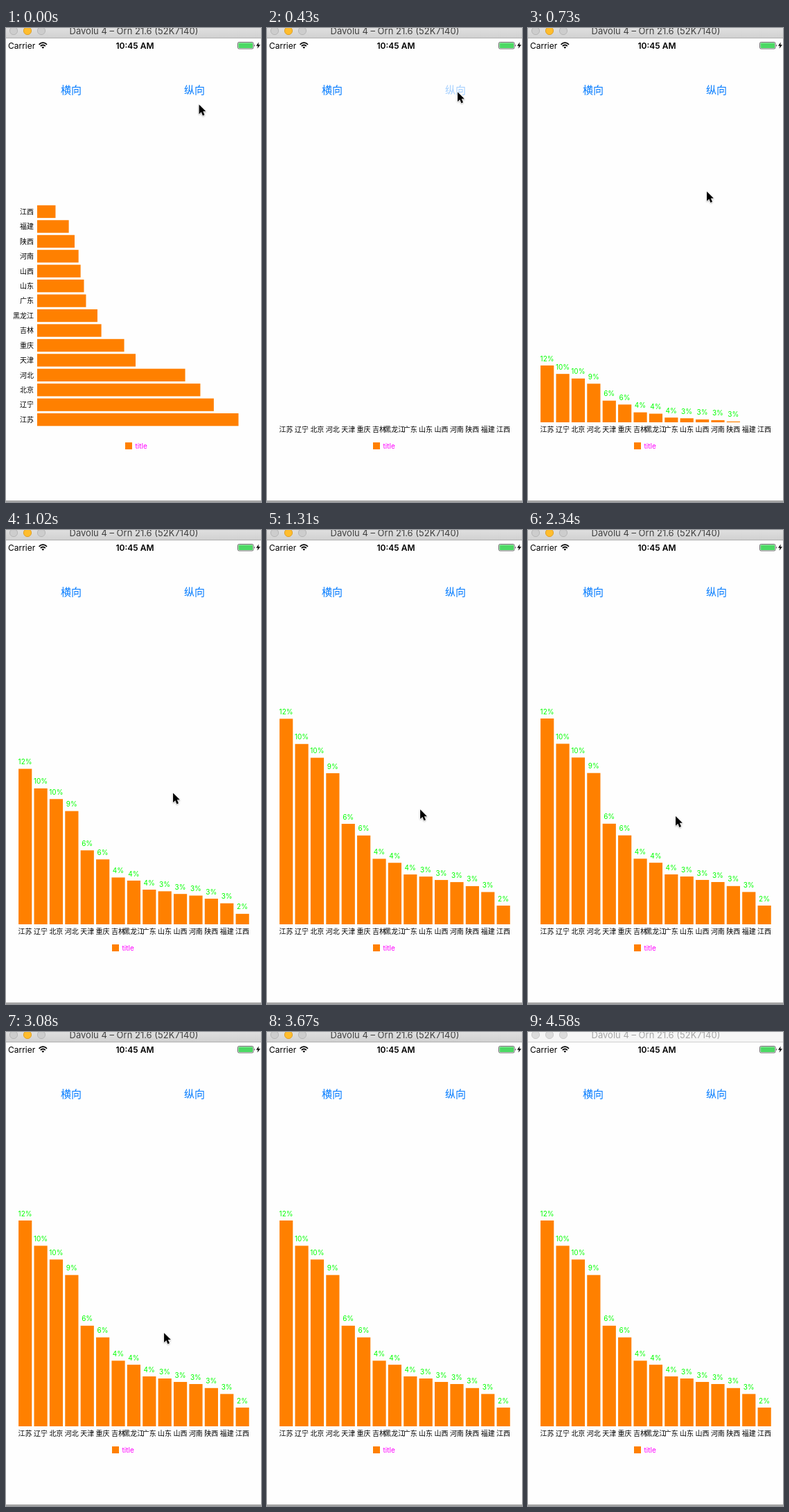
Animation of 368 by 684 pixels, one loop 4680 ms. Source, as an HTML page:

```html
<!DOCTYPE html>
<html lang="zh-CN">
<head>
<meta charset="utf-8">
<title>Bar chart</title>
<style>
  html, body { margin: 0; width: 100%; height: 100%; overflow: hidden; background: #fefefe; }
  svg { display: block; width: 368px; height: 684px; }
  text { font-family: Inter, "Noto Sans CJK SC", "Noto Sans CJK", sans-serif; white-space: pre; }
  .cjk { font-family: "Noto Sans CJK SC", "Noto Sans CJK", "Noto Sans", sans-serif; }
  .mid { text-anchor: middle; }
  .end { text-anchor: end; }
  .small { font-size: 10px; }
  .button { font-size: 15px; fill: #007aff; }
  .bar { fill: #ff8000; }
  .percent { fill: #00ff00; }
  .legend { fill: #ff00ff; }

  #titlebar { fill: url(#active); }
  #edge { fill: #b0b0b0; }
  #title { fill: #404040; }
  #lights circle { fill: #cdcdcd; stroke: #b6b6b6; }
  #lights .yellow { fill: #ffbd2e; stroke: #e0a028; }
  .inactive #titlebar { fill: #f6f6f6; }
  .inactive #edge { fill: #d0d0d0; }
  .inactive #title { fill: #a6a6a6; }
  .inactive #lights circle { fill: #dcdcdc; stroke: #cacaca; }
</style>
</head>
<body>
<svg id="stage" viewBox="0 0 368 684" xmlns="http://www.w3.org/2000/svg">
  <defs>
    <linearGradient id="active" x2="0" y2="1">
      <stop stop-color="#dfdfdf"/><stop offset="1" stop-color="#d1d1d1"/>
    </linearGradient>
    <filter id="soft" x="-50%" y="-50%" width="200%" height="200%">
      <feDropShadow dx="0" dy="1" stdDeviation="0.8" flood-opacity="0.35"/>
    </filter>
  </defs>
  <rect width="368" height="684" fill="#fefefe"/>

  <rect id="titlebar" width="368" height="14"/>
  <rect id="edge" y="14" width="368" height="1"/>
  <g id="lights">
    <circle cx="11" cy="4" r="5.6"/>
    <circle cx="31" cy="4" r="5.6" class="yellow"/>
    <circle cx="51" cy="4" r="5.6"/>
  </g>
  <text id="title" class="mid" x="184.5" y="9" font-size="13">Davolu 4 – Orn 21.6 (52K7140)</text>

  <text x="3" y="29.5" font-size="12">Carrier</text>
  <g fill="none" stroke="#000" stroke-width="1.8">
    <path d="M47.6 23.9Q53.3 18.4 59 23.9"/>
    <path d="M49.8 26.2Q53.3 22.9 56.8 26.2"/>
  </g>
  <path d="M51.4 27.7Q53.3 26.1 55.2 27.7L53.3 29.7Z"/>
  <text class="mid" x="186" y="29.5" font-size="12" font-weight="600">10:45 AM</text>
  <rect x="334.5" y="20.5" width="22.5" height="9.5" rx="1.8" fill="none" stroke="#444" stroke-width="0.8"/>
  <rect x="335.5" y="21.5" width="20.5" height="7.5" rx="0.8" fill="#4cd964"/>
  <path d="M358 23.5q1.5 1.8 0 3.6z"/>
  <path d="M364.8 20.5L361 25.8H363.6L362.6 29.8L367 24.2H364.2Z"/>

  <text class="button cjk" x="79" y="94.6">横向</text>
  <text class="button cjk" x="257" y="94.6" id="vertical">纵向</text>

  <g id="rows"></g>
  <g id="columns"></g>

  <rect y="682" width="368" height="1" fill="#858585"/>
  <rect y="683" width="368" height="1" fill="#b8b8b8"/>
  <path id="cursor" d="M0.6 0.4V14.2L3.8 11.2L6 16.4L8.5 15.3L6.3 10.3H10.4Z"
    fill="#000" stroke="#fff" stroke-linejoin="round" paint-order="stroke" filter="url(#soft)"/>
</svg>
<script>
const LOOP = 4680;
const TICK = 146.5;    // the screen refreshes once per tick
const LEAD = 14;       // ms by which refreshes run early
const BASE = 569;      // bottom of the columns
const AXIS_MIN = 0.94; // percent value at the axis
const ROW_UNIT = 27;   // px per percent
const COLUMN_UNIT = 27.6;
const GROW_START = 340;
const GROW_TIME = 1000;

const PRESS = 2, SWITCH = 3, RELEASED = 5;   // ticks of the button press
const LIFT_FROM = 12, LIFT_TO = 16, LIFT = 11;
const CURSOR_GONE = 25, INACTIVE = 31;

const data = Object.entries({
  江苏: 11.7, 辽宁: 10.38, 北京: 9.66, 河北: 8.85, 天津: 6.2,
  重庆: 5.59, 吉林: 4.37, 黑龙江: 4.16, 广东: 3.55, 山东: 3.44,
  山西: 3.26, 河南: 3.15, 陕西: 2.94, 福建: 2.63, 江西: 1.92
});

// cursor stops: tick, x, y, ease-out power of the move that arrives there
const stops = [
  [0, 278, 110, 1],
  [3, 274.5, 92, 3],
  [7, 240.5, 379, 1],
  [11, 212.5, 412.5, 1.8],
  [17, 212.5, 412.5, 1],
  [19, 140.5, 106, 3],
  [20, 140.5, 106, 1],
  [24, 291, 673, 3]
];

const $ = id => document.getElementById(id);
const clamp = u => Math.min(1, Math.max(0, u));
const mix = (a, b, u) => a + (b - a) * u;
const easeSine = u => (1 - Math.cos(Math.PI * clamp(u))) / 2;
const easeOut = (u, power) => 1 - (1 - clamp(u)) ** power;

function set(node, attrs) {
  for (const key in attrs) node.setAttribute(key, attrs[key]);
}

function show(node, visible) {
  set(node, { visibility: visible ? "inherit" : "hidden" });
}

function add(parent, tag, attrs, content = "") {
  const node = document.createElementNS("http://www.w3.org/2000/svg", tag);
  set(node, attrs);
  node.textContent = content;
  parent.append(node);
  return node;
}

function addLegend(parent, x) {
  add(parent, "rect", { class: "bar", x, y: 598, width: 10, height: 10 });
  add(parent, "text", { class: "legend small", x: x + 14.6, y: 607 }, "title");
}

function buildRows() {
  const group = $("rows");
  data.forEach(([name, value], i) => {
    const y = 556 - i * 21.44;
    const width = ROW_UNIT * (value - AXIS_MIN);
    add(group, "rect", { class: "bar", x: 45, y, width, height: 18.3 });
    add(group, "text", { class: "cjk small end", x: 40, y: y + 12.9 }, name);
  });
  addLegend(group, 172);
}

function buildColumns() {
  const group = $("columns");
  const columns = data.map(([name, value], i) => {
    const x = 18.1 + i * 22.39;
    const mid = x + 9.5;
    add(group, "text", { class: "cjk small mid", x: mid, y: 583.3 }, name);
    return {
      value,
      bar: add(group, "rect", { class: "bar", x, width: 19.2 }),
      label: add(group, "text", { class: "percent small mid", x: mid }, Math.round(value) + "%")
    };
  });
  addLegend(group, 153);
  return columns;
}

function drawColumns(growth, lift) {
  for (const { value, bar, label } of columns) {
    const height = Math.max(0, COLUMN_UNIT * (value * growth - AXIS_MIN));
    set(bar, { y: BASE - height, height });
    set(label, { y: BASE - height - 6.4 - lift });
    show(label, height > 0);
  }
}

function drawCursor(tick) {
  const next = Math.max(1, stops.findIndex(stop => stop[0] >= tick));
  const [start, x0, y0] = stops[next - 1];
  const [end, x1, y1, power] = stops[next];
  const u = easeOut((tick - start) / (end - start), power);
  set($("cursor"), { transform: `translate(${mix(x0, x1, u)} ${mix(y0, y1, u)})` });
}

function draw(tick) {
  show($("rows"), tick < SWITCH);
  show($("columns"), tick >= SWITCH);
  const growth = easeSine((tick * TICK - GROW_START) / GROW_TIME);
  drawColumns(growth, tick >= LIFT_FROM && tick < LIFT_TO ? LIFT : 0);

  const fade = clamp((tick - PRESS) / (RELEASED - PRESS));
  set($("vertical"), { opacity: tick < PRESS ? 1 : mix(0.2, 1, fade ** 1.5) });

  show($("cursor"), tick < CURSOR_GONE);
  if (tick < CURSOR_GONE) drawCursor(tick);
  $("stage").classList.toggle("inactive", tick >= INACTIVE);
}

buildRows();
const columns = buildColumns();
let shown;

function run() {
  const time = performance.now() % LOOP;
  const tick = Math.min(INACTIVE, Math.floor((time + LEAD) / TICK));
  if (tick !== shown) draw(shown = tick);
  requestAnimationFrame(run);
}
run();
</script>
</body>
</html>
```
